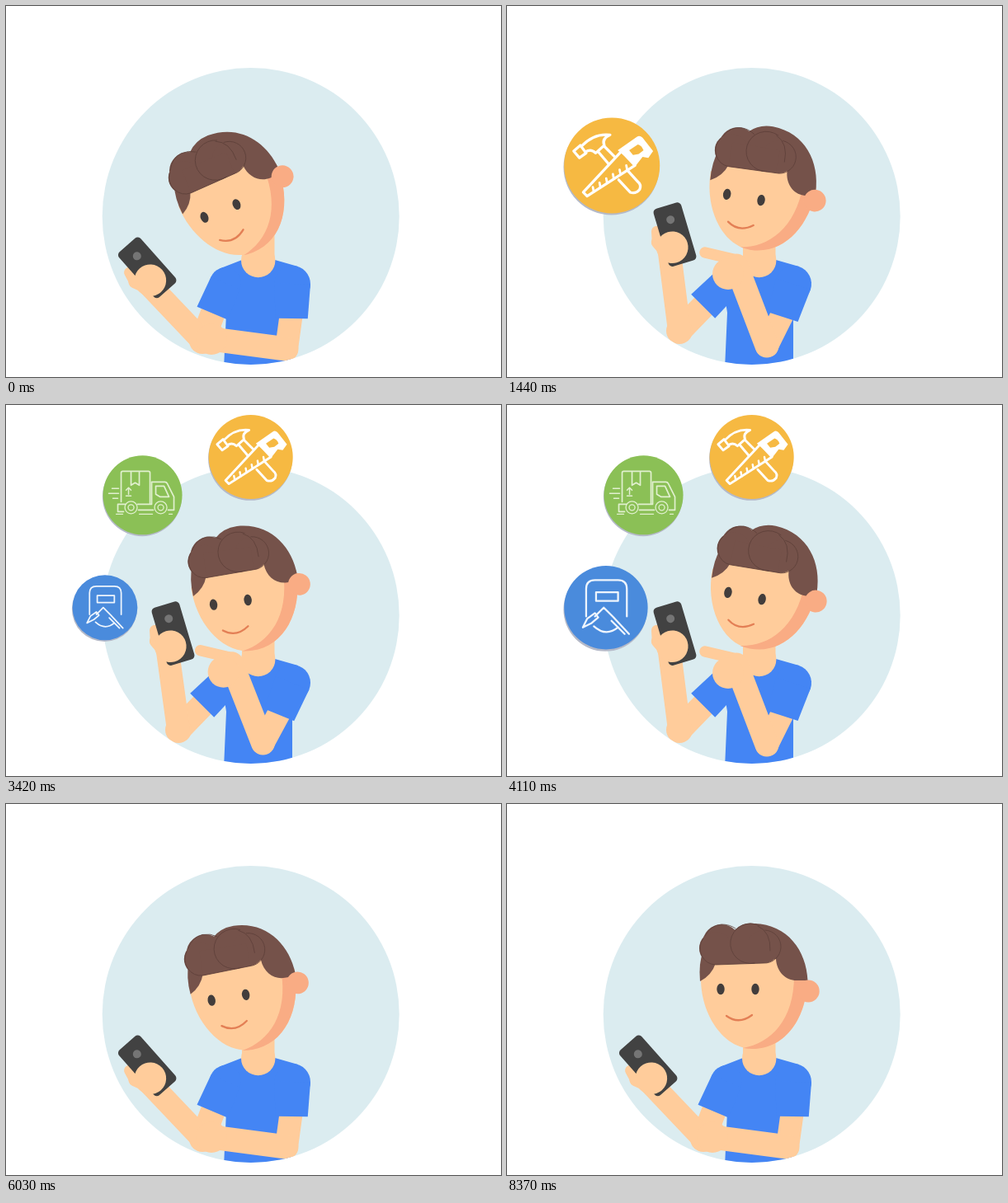
Animation, 600 px wide and 450 px high, one loop 9000 ms. Source, as an HTML page with a canvas:

```html
<!DOCTYPE html>
<html lang="en">
<head>
<meta charset="utf-8">
<title>Phone helper</title>
<style>
html, body { margin: 0; width: 100%; height: 100%; overflow: hidden; background: #fff; }
canvas { display: block; }
</style>
</head>
<body>
<canvas id="stage" width="600" height="450"></canvas>
<script>
const ctx = document.getElementById('stage').getContext('2d');
const LOOP = 9000, STEP = 30, TAU = Math.PI * 2, RAD = Math.PI / 180;
const DISC = { x: 296.7, y: 255, r: 180 };
const SKIN = '#ffcc9b', SHADE = '#f9ac84', HAIR = '#75524a', LINE = '#5e403a';
const SHIRT = '#4485f4', DARK = '#424242', GOLD = '#f6b942';

// 0 before a, 1 after b, cosine in between
const ease = (t, a, b) => (1 - Math.cos(Math.PI * Math.min(1, Math.max(0, (t - a) / (b - a))))) / 2;
const pulse = (t, peak, half) => ease(t, peak - half, peak) - ease(t, peak, peak + half);

const ICONS = [
  { born: 980, size: 51, home: -168, far: 192, color: GOLD, art: tools, artSize: 50,
    slide: t => 36 * ease(t, 1200, 1970) + 42 * ease(t, 1970, 2680) },
  { born: 2370, size: 48, home: -168, far: 196, color: '#8bc056', art: truck, artSize: 48,
    slide: t => 36 * ease(t, 2600, 3400) },
  { born: 3170, size: 50, home: -177, far: 179, color: '#4a8bdc', art: welder, artSize: 38,
    slide: () => 0 }
];

function dot(x, y, r, color) {
  ctx.fillStyle = color;
  ctx.beginPath();
  ctx.arc(x, y, r, 0, TAU);
  ctx.fill();
}

function shape(d, color) {
  ctx.fillStyle = color;
  ctx.fill(new Path2D(d));
}

function stroke(d, color, w) {
  ctx.strokeStyle = color;
  ctx.lineWidth = w;
  ctx.lineCap = ctx.lineJoin = 'round';
  ctx.stroke(new Path2D(d));
}

function limb(x1, y1, x2, y2, w) {
  stroke(`M${x1} ${y1} L${x2} ${y2}`, SKIN, w);
}

function spin(x, y, deg) {
  const c = Math.cos(deg * RAD), s = Math.sin(deg * RAD);
  return [x * c - y * s, x * s + y * c];
}

function placed(x, y, deg, paint) {
  ctx.save();
  ctx.translate(x, y);
  ctx.rotate(deg * RAD);
  paint();
  ctx.restore();
}

function tools() {
  const w = '#fff';
  stroke('M-40 -15 L-33 -21 L-27 -13 L-34 -8 Z M-32 -20 Q-19 -34 -2 -32 Q-11 -28 -8 -21 L-17 -13 Q-22 -18 -28 -14', w, 2.8);
  stroke('M-14 -14 L-3 -1 M-8 -20 L5 -7 M7 15 L19 28 Q25 30 29 25 Q31 20 27 17 L17 6', w, 2.8);
  shape('M-30 28 L10 -15 L24 0 L-26 32 Z', GOLD);
  stroke('M-30 28 L10 -15 L24 0 L-26 32 Z', w, 2.8);
  for (let i = 0; i < 6; i++) {
    const x = -19 + i * 7, y = 27.5 - i * 4.5;
    stroke(`M${x} ${y} l-1 -5`, w, 2.4);
  }
  shape('M6 -16 L26 -30 Q29 -32 32 -29 L43 -15 L38 -8 L32 -9 L25 0 Z', w);
  shape('M18 -16 L27 -22 Q31 -21 33 -16 L28 -12 L22 -11 Z', GOLD);
}

function truck() {
  const w = '#e1f0cf';
  stroke('M-26 8 V-27 Q-26 -29 -24 -29 H7 Q9 -29 9 -27 V10 M-14 -29 V-12 L-9 -15 L-4 -12 V-29', w, 1.7);
  stroke('M-21 11 H-30 V20 H-23 M-5 18 H13 M31 18 H38 V2 L30 -14 Q29 -16 27 -16 H11 V11 H-6 M16 -11 H26 L32 2 H21 L16 -1 Z', w, 1.7);
  stroke('M-17 -1 V-9 M-20 -6 L-17 -9 L-14 -6 M-20 1 H-14 M-37 -8 H-29 M-41 -2 H-29 M-36 4 H-30', w, 1.5);
  stroke('M-32 23 H-24 M-4 23 H12 M32 23 H36', w, 1.3);
  for (const x of [-14, 22]) {
    for (const r of [7.5, 3.5]) {
      ctx.beginPath();
      ctx.arc(x, 15, r, 0, TAU);
      ctx.stroke();
    }
  }
}

function welder() {
  const w = '#eef5fd';
  stroke('M-18 8 V-17 Q-18 -25 -10 -25 H11 Q19 -25 19 -17 V8 M-11 17 Q0 27 11 18 M-9 -14 H11 V-6 H-9 Z', w, 1.7);
  stroke('M-21 18 L-17 10 L-10 5 L-7 9 L-13 14 Z M-10 8 L-2 0 L8 10 M7 9 L21 24 M5 12 L17 24', w, 1.7);
}

// Pops up with an overshoot, rides round the disc, then drops into the phone
function drawIcon(icon, t) {
  const age = t - icon.born, sink = Math.pow(Math.max(0, (t - 4400) / 415), 1.6);
  if (age <= 0 || sink >= 1) return;
  const slid = icon.slide(t);
  const dist = 177 + (icon.far - 177) * Math.min(1, slid / 36);
  const [ox, oy] = spin(dist, 0, icon.home + slid);
  const x = DISC.x + ox, y = DISC.y + oy;
  const r = ((icon.size + 7) * ease(age, 0, 400) - 7 * ease(age, 500, 1050)) * (1 - sink);
  placed(x + (189 - x) * sink, y + (279 - y) * sink, 0, () => {
    ctx.scale(r / icon.artSize, r / icon.artSize);
    dot(-0.6, 1.8, icon.artSize, '#b4b9c8');
    dot(0, 0, icon.artSize, icon.color);
    icon.art();
  });
}

function sleeve(x, y, r, len, half, deg) {
  placed(x, y, deg, () => {
    dot(0, 0, r, SHIRT);
    shape(`M0 ${-r} L${len} ${-half} V${half} L0 ${r} Z`, SHIRT);
  });
}

function drawBody() {
  shape('M259 318.5 L286 308 H326 L354 316 L347 345 V440 H264 L267 372 Z', SHIRT);
  ctx.fillStyle = SKIN;
  ctx.fillRect(286, 265, 39.5, 44);
  dot(305.7, 308.5, 20.7, SKIN);
}

function drawHead(t) {
  const turn = -22 + 36 * ease(t, 0, 1850) - 26 * ease(t, 1950, 2650) + 24 * ease(t, 3200, 4000)
    - 32 * ease(t, 4000, 5200) + 20 * ease(t, 5200, 6800);
  const look = 1 - ease(t, 5450, 6600);
  const drop = 7 * look;
  placed(305 - 0.15 * Math.abs(turn), 285, turn, () => {
    ctx.translate(-305, -285);
    shape('M235 212 C235 255 262 297 298 297 C338 297 364 258 364 212 L330 165 L250 178 Z', SKIN);
    shape('M286 296 C320 290 348 262 348 208 H364 V212 C364 258 338 297 298 297 Q292 297 286 296 Z', SHADE);
    shape(`M272 156 Q283 145 300 145 C340 146 363 178 364.5 214 L364 ${214 + drop} H351
      C338 ${214 + drop} 327 ${204 + drop} 326 ${188 + drop} L290 185 Z`, HAIR);
    dot(365.3, 227 - 2 * look, 13.4, SHADE);
    placed(2 * look, drop, 0, drawFringe);
    drawFace(11 * look);
  });
}

function drawFringe() {
  shape('M234 215 Q232 193 238 178 L253 193 Q248 208 234 215 Z', HAIR);
  dot(260, 169, 23, HAIR);
  dot(253, 175, 20, HAIR);
  dot(295, 169, 24.5, HAIR);
  dot(311, 173, 20, HAIR);
  shape('M253 165 H311 V193 L253 195 Z', HAIR);
  stroke('M238 163 A20 20 0 0 0 253 195 L311 193 A20 20 0 0 0 313 153', LINE, 0.8);
  stroke('M304 148 Q320 155 319 178', LINE, 0.8);
  stroke('M300 193 A24.3 24.3 0 1 1 306 147.5 M240 160 Q247 147 260 146 Q270 146 277 151', LINE, 0.8);
}

function drawFace(shift) {
  ctx.translate(0, shift);
  ctx.fillStyle = '#423d3c';
  for (const x of [259, 301]) {
    ctx.beginPath();
    ctx.ellipse(x, 224.5, 4.7, 6.7, 0, 0, TAU);
    ctx.fill();
  }
  stroke('M266 257 Q281 268 297 256', '#e37f55', 2.3);
}

function drawPhoneArm(t, tap) {
  const lift = ease(t, 400, 950) - ease(t, 4400, 4800);
  const bend = ease(t, 0, 950) - ease(t, 4400, 5200);
  const upper = 113 + 22 * lift, tilt = -41.5 + 25 * bend;
  const ex = 238 - 29 * lift, ey = 406 - 12 * lift;
  const [fx, fy] = spin(111 + 6 * lift, 0, -127 + 34.3 * bend);
  const px = ex + fx - 3 * tap, py = ey + fy;
  const [sx, sy] = spin(32, 0, upper), [gx, gy] = spin(-12, 16, tilt);

  limb(266 + sx, 336 + sy, ex, ey, 30);
  sleeve(266, 336, 19, 40, 20.5, upper);
  dot(ex, ey, 16, SKIN);
  limb(px + gx, py + gy, ex, ey, 28);
  placed(px, py, tilt, () => {
    limb(-20, -10, -23, 3, 13);
    ctx.fillStyle = DARK;
    ctx.beginPath();
    ctx.roundRect(-17.5, -36.5, 35, 73, 5);
    ctx.fill();
    dot(0, -18.7, 5, '#757575');
    limb(-23, 3, -14, 23, 15);
    dot(-7.5, 14, 19.3, SKIN);
  });
}

function drawTapArm(t, tap) {
  const reach = ease(t, 0, 950) - ease(t, 4450, 5450);
  const upper = 91 + 17 * reach + 13 * tap, turn = -160 * (1 - reach);
  const ex = 340 - 25 * reach - 11 * tap, ey = 416 - 4 * reach - 6 * tap;
  const hx = 249 + 19 * reach - 17 * Math.sin(Math.PI * reach) - 13.5 * tap;
  const hy = 404 - 79 * reach - 4 * tap;
  const [sx, sy] = spin(32, 0, upper);

  limb(347 + sx, 337 + sy, ex, ey, 28);
  sleeve(347, 337, 22, 42, 19.5, upper);
  placed(hx, hy, turn, () => limb(-28 * reach, -26 * reach, 6 * reach, -18 * reach, 13.5));
  const grip = Math.min(1, reach * 1.5), [wx, wy] = spin(10 * grip, -10 * grip, turn);
  limb(hx + wx, hy + wy, ex, ey, 29);
  dot(hx, hy, 19, SKIN);
}

function draw(t) {
  const tap = ICONS.reduce((sum, icon) => sum + pulse(t, icon.born + 90, 260), 0);
  ctx.fillStyle = '#fff';
  ctx.fillRect(0, 0, 600, 450);
  dot(DISC.x, DISC.y, DISC.r, '#dbecf0');
  for (const icon of ICONS) drawIcon(icon, t);
  ctx.save();
  ctx.beginPath();
  ctx.arc(DISC.x, DISC.y, DISC.r, 0, TAU);
  ctx.clip();
  drawBody();
  drawHead(t);
  drawPhoneArm(t, tap);
  drawTapArm(t, tap);
  ctx.restore();
}

const start = performance.now();
function tick() {
  const t = (performance.now() - start) % LOOP;
  draw(Math.floor(t / STEP) * STEP);
  requestAnimationFrame(tick);
}
tick();
</script>
</body>
</html>
```
